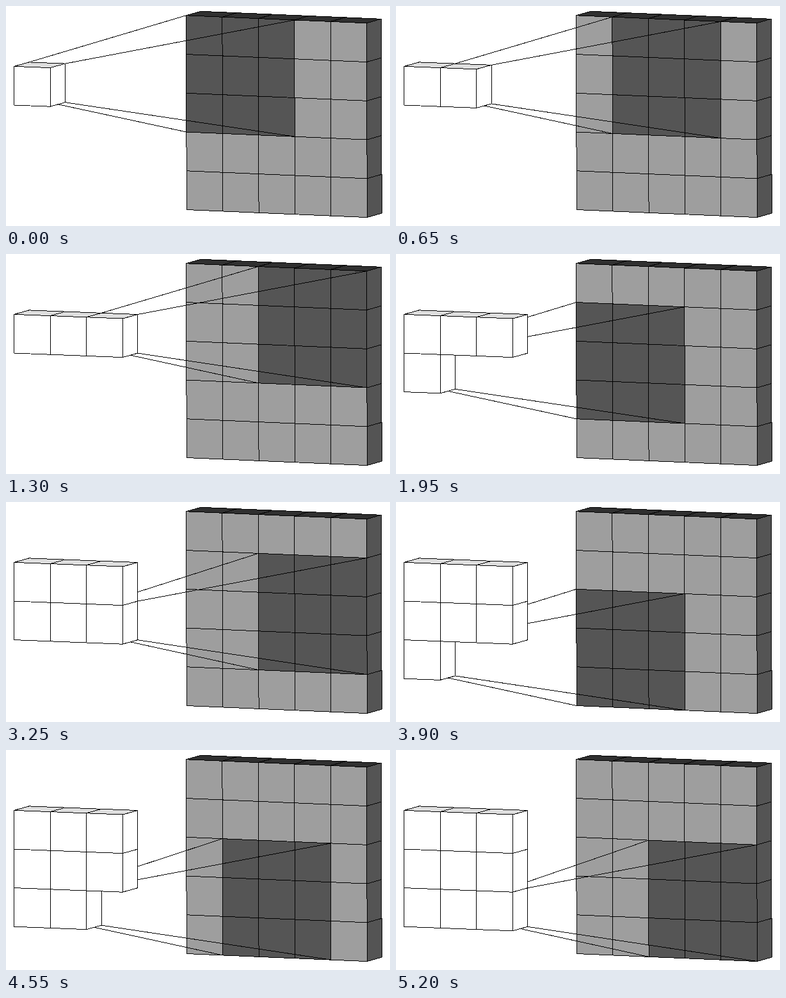
An HTML page for the animation above (5850 ms loop, 600x344 px).

```html
<!DOCTYPE html>
<html lang="en">
<head>
<meta charset="utf-8">
<title>Convolution with a stride of one</title>
<style>
html, body { margin: 0; width: 100%; height: 100%; overflow: hidden; background: #fff; }
svg { display: block; width: 600px; height: 344px; }
path { stroke: #000; stroke-width: 1; stroke-linejoin: round; shape-rendering: crispEdges; }
</style>
</head>
<body>
<svg id="stage" viewBox="0 0 600 344"></svg>
<script>
const STEP = 650, SIZE = 3;
const stage = document.getElementById('stage');

// A wall of cubes: origin, column vector, row vector, depth vector.
const input = { o: [281.5, 14.8], col: [56.4, 2.4], row: [0.15, 60.75], depth: [22.9, -6.5], top: '#303030', side: '#545454' };
const output = { o: [12.5, 94.4], col: [56.6, 2.2], row: [0, 60.6], depth: [23.4, -6.5], top: '#dedede', side: '#fff' };

const point = (g, c, r, d = 0) =>
  [0, 1].map(i => g.o[i] + c * g.col[i] + r * g.row[i] + d * g.depth[i]);
const path = (points, fill) =>
  `<path d="M${points.map(p => p.map(v => v.toFixed(2))).join('L')}${fill ? 'Z' : ''}" fill="${fill || 'none'}"/>`;

function cube(g, c, r, front) {
  const p = (x, y, d) => point(g, c + x, r + y, d);
  return path([p(0, 0), p(1, 0), p(1, 0, 1), p(0, 0, 1)], g.top)
    + path([p(1, 0), p(1, 1), p(1, 1, 1), p(1, 0, 1)], g.side)
    + path([p(0, 0), p(1, 0), p(1, 1), p(0, 1)], front);
}

// Bottom row first, left to right, so nearer faces cover hidden ones.
function wall(g, n, front) {
  let out = '';
  for (let r = n - 1; r >= 0; r--)
    for (let c = 0; c < n; c++) {
      const fill = front(c, r);
      if (fill) out += cube(g, c, r, fill);
    }
  return out;
}

// Lines join the back corners of the newest cube to the corners of its window.
function sightLines(c, r) {
  const line = (x, y, shift = 0) => {
    const [fromX, fromY] = point(output, c + x, r + y, 1);
    return path([[fromX, fromY + shift], point(input, c + x * SIZE, r + y * SIZE)]);
  };
  // The hidden left corners sit slightly inside the cube.
  return line(0, 0, r * (2 + 2 * c)) + line(1, 0) + line(0, 1, -4.5) + line(1, 1);
}

function draw(step) {
  const c = step % SIZE, r = Math.floor(step / SIZE);
  const covered = (x, y) => x >= c && x < c + SIZE && y >= r && y < r + SIZE;
  stage.innerHTML =
    wall(input, 5, (x, y) => covered(x, y) ? '#555' : '#9e9e9e')
    + sightLines(c, r)
    + wall(output, SIZE, (x, y) => y * SIZE + x <= step && '#fff');
}

const begin = performance.now();
let shown = -1;
function tick() {
  const step = Math.floor((performance.now() - begin) / STEP) % (SIZE * SIZE);
  if (step !== shown) draw(shown = step);
  requestAnimationFrame(tick);
}
tick();
</script>
</body>
</html>
```
